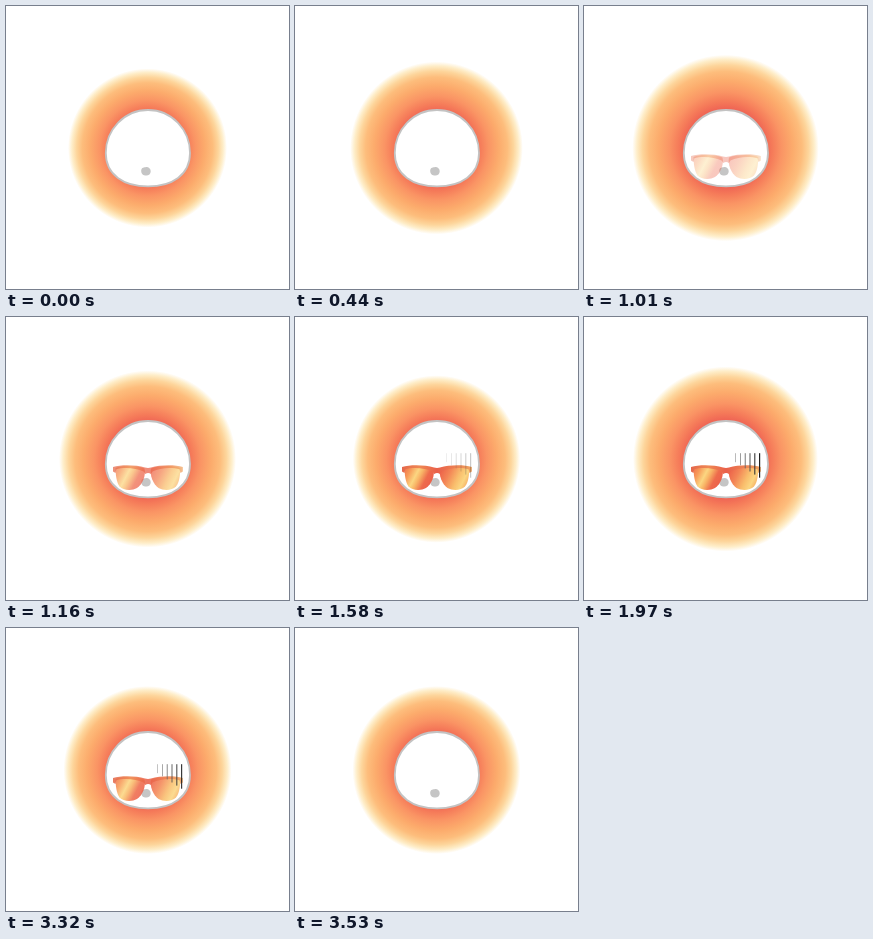
Recreate the animation shown at these times as an HTML page with a canvas. Size 283 by 283 pixels, loop 3560 ms.

```html
<!DOCTYPE html>
<html lang="en">
<head>
<meta charset="utf-8">
<title>Sunny face</title>
<style>
html, body { margin: 0; width: 100%; height: 100%; overflow: hidden; background: #fff; }
canvas { display: block; width: 283px; height: 283px; }
</style>
</head>
<body>
<canvas id="stage"></canvas>
<script>
const SIZE = 283, LOOP = 3560;
const canvas = document.getElementById('stage');
const ctx = canvas.getContext('2d');
const scale = Math.max(1, window.devicePixelRatio || 1);
canvas.width = canvas.height = Math.round(SIZE * scale);

const face = new Path2D('M142 104C166 104 184 124 184 147C184 169 166 180.4 142 180.4C118 180.4 99.8 169 99.8 147C99.8 124 118 104 142 104Z');
const snout = new Path2D('M135.2 165C135.2 162 137 161.2 139.5 161.2C142 160.6 144.8 162.4 144.7 165.2C144.8 168 142.5 169.8 140 169.6C137.5 169.6 135.2 168 135.2 165Z');
const leftLens = new Path2D('M109.5 151C116 148.3 130 148.5 138.5 151.5C140 158 137 167 131 171C126 174 117 173.5 113.5 169.5C110.5 165.5 109.5 157 109.5 151Z');
const rightLens = new Path2D('M145 151.5C153 148.5 168 148.3 174.3 151C174.3 157 173.5 165.5 170 169.5C166 173.5 158 174 152.5 171C147 167 143.5 158 145 151.5Z');
const rim = new Path2D('M107 150C115 147.4 130 147.6 139 150.6Q142 151.3 145 150.6C154 147.6 169 147.4 176.8 150V154.5L174.5 156L173.5 152.2C166 150 154 150.5 146.5 154.5L145 157Q142 154.8 139.3 157L137.5 154.5C130 150.5 117 150 110.3 152.2L109.5 156L107 154.5Z');

function linear(x0, y0, x1, y1, stops) {
  const g = ctx.createLinearGradient(x0, y0, x1, y1);
  stops.forEach(([at, color]) => g.addColorStop(at, color));
  return g;
}

const leftFill = linear(108, 153, 137, 168, [
  [0, '#f0714c'], [.2, '#f79a59'], [.42, '#fbd681'], [.55, '#f8b466'], [.75, '#ee6b4c'], [1, '#ec5f4a']
]);
const rightFill = linear(145, 153, 174, 167, [
  [0, '#ec6049'], [.3, '#f38556'], [.6, '#f9bd6c'], [.8, '#fbd681'], [1, '#f6a75f']
]);
const rimFill = linear(107, 0, 177, 0, [
  [0, '#e4684c'], [.25, '#ef8853'], [.5, '#e9604a'], [.8, '#ee8654'], [1, '#efa562']
]);

const clamp = v => Math.max(0, Math.min(1, v));
const progress = (t, from, to) => clamp((t - from) / (to - from));
const smooth = p => p * p * (3 - 2 * p);
const mix = (a, b, p) => a + (b - a) * p;
const step = (t, start, size) => start + Math.floor((t - start + .01) / size) * size;

function glowRadius(t) {
  if (t < 230) return 78.5;
  if (t < 920) return mix(78.5, 96, smooth(progress(step(t, 230, 80), 150, 710)));
  if (t < 1490) return mix(96, 80, progress(step(t, 920, 30), 890, 1400));
  if (t < 1970) return mix(80, 91.5, progress(step(t, 1490, 30), 1460, 1970));
  if (t < 2420) return mix(91.5, 95.5, progress(step(t, 1970, 120), 1970, 2210));
  return mix(94.5, 83, smooth(progress(step(t, 2420, 120), 2420, 2900)));
}

function drawGlow(r) {
  const g = ctx.createRadialGradient(141.5, 142, 0, 141.5, 142, r + 1);
  [[0, '#e63c4a'], [.42, '#ef6454'], [.5, '#f57a59'], [.6, '#fa9464'], [.72, '#fcab6c'],
   [.82, '#fdbd7c'], [.89, '#fdd59b'], [.95, '#feedc8'], [1, '#ffffff']]
    .forEach(([at, color]) => g.addColorStop(at, color));
  ctx.fillStyle = g;
  ctx.beginPath();
  ctx.arc(141.5, 142, r + 1, 0, Math.PI * 2);
  ctx.fill();
}

function fill(path, style) {
  ctx.fillStyle = style;
  ctx.fill(path);
}

function drawFace() {
  fill(face, '#fff');
  ctx.strokeStyle = '#c3c3c3';
  ctx.lineWidth = 1.8;
  ctx.stroke(face);
  fill(snout, '#c5c5c5');
}

function drawGlasses(alpha) {
  ctx.globalAlpha = alpha;
  fill(leftLens, leftFill);
  fill(rightLens, rightFill);
  fill(rim, rimFill);
}

function drawLines(alpha) {
  ctx.globalAlpha = alpha;
  for (let i = 0; i < 6; i++) {
    const shade = Math.round(150 - i * 24);
    ctx.fillStyle = `rgb(${shade},${shade},${shade})`;
    const w = .65 + i * .11;
    ctx.fillRect(151.6 + i * 4.8 - w / 2, 136.2, w, 9 + i * 3.1);
  }
}

function draw(t) {
  ctx.setTransform(scale, 0, 0, scale, 0, 0);
  ctx.globalAlpha = 1;
  ctx.fillStyle = '#fff';
  ctx.fillRect(0, 0, SIZE, SIZE);
  drawGlow(glowRadius(t));
  drawFace();

  const fade = 1 - progress(step(t, 3290, 30), 3290, 3530);
  const worn = Math.sin(progress(step(t, 890, 30), 890, 1400) * Math.PI / 2);
  const lined = progress(step(t, 1460, 30), 1460, 1970);
  if (worn * fade > 0) drawGlasses(worn * fade);
  if (lined * fade > 0) drawLines(lined * fade);
}

const start = performance.now();
function tick() {
  draw((performance.now() - start) % LOOP);
  requestAnimationFrame(tick);
}
tick();
</script>
</body>
</html>
```
